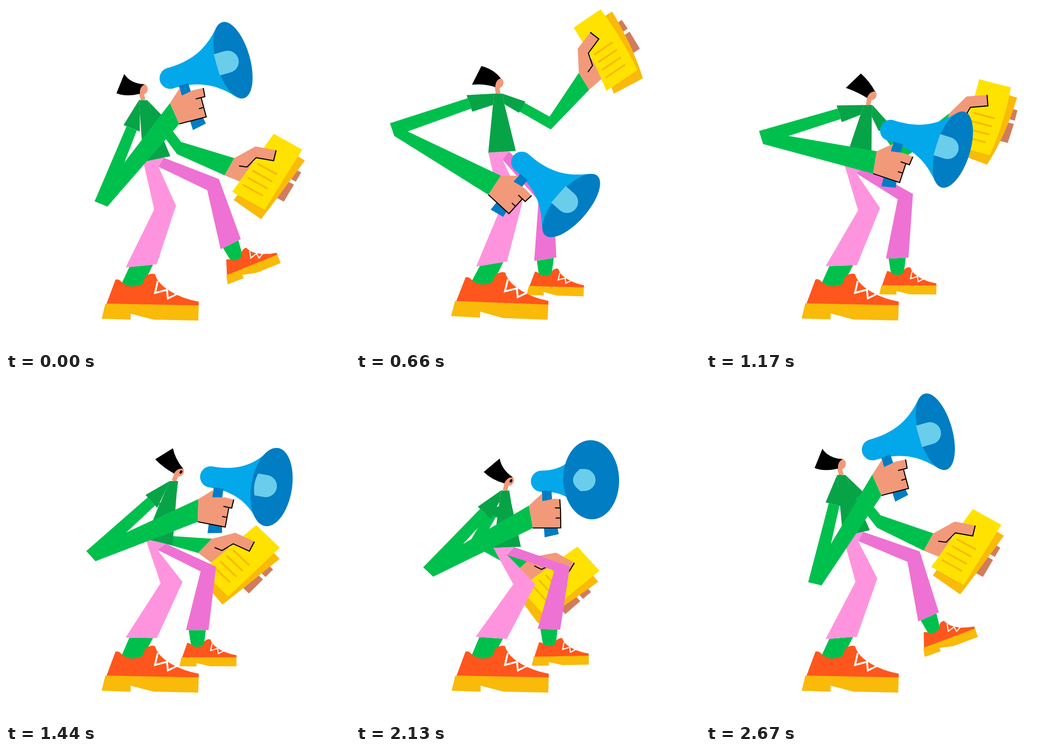
An HTML page with a canvas for the animation above (2.7 s loop, 748 by 748 pixels).

```html
<!DOCTYPE html>
<html lang="en">
<head>
<meta charset="utf-8">
<title>Walking announcer</title>
<style>
  html, body { margin: 0; height: 100%; overflow: hidden; background: #fff; }
  canvas { display: block; width: 100vw; height: 100vh; }
</style>
</head>
<body>
<canvas width="748" height="748"></canvas>
<script>
const ctx = document.querySelector('canvas').getContext('2d');
const LOOP = 2700;
const GREEN = '#00c04d', SHIRT = '#07a347', SKIN = '#f2997a', BLUE = '#007dc3', AMBER = '#f9ba09';

// hip, neck: x, y. head: tilt, hair curl. horn: x, y, angle, turn to the viewer.
// paper: x, y, angle, bend. step: lift of the far foot. All limbs follow from these.
const poses = [
  { t: 0, hip: [328, 333], neck: [298, 205], head: [0, 1], horn: [357, 157, -16, .1], paper: [571, 360, 29, 0], step: [1] },
  { t: 390, hip: [313, 306], neck: [286, 181], head: [0, .1], horn: [377, 308, 43.3, 0], paper: [510, 166, -33, -.12], step: [.04] },
  { t: 660, paper: [541, 94, -34, .05] },
  { t: 900, hip: [325, 334], neck: [335, 205], head: [12, -1], horn: [353, 330, 27.6, 0], paper: [579, 130, -34, .22], step: [0] },
  { t: 1090, paper: [613, 199, 2, .1] },
  { t: 1440, hip: [333, 357], neck: [365, 224], head: [36, .5], horn: [445, 215, 9.5, .35], paper: [513, 396, 43.5, 0], step: [0] },
  { t: 1860, hip: [333, 361], neck: [374, 236], head: [45, .6], horn: [410, 243, 11.8, .91], paper: [401, 440, 53, 0], step: [0] },
  { t: 2400, hip: [325, 365], neck: [280, 241], head: [8, 1], horn: [393, 191, -15.2, .35], paper: [521, 417, 38, 0], step: [.31] },
  { t: 2670, hip: [327, 338], neck: [294, 211], head: [0, 1], horn: [362, 156, -16, .1], paper: [569, 367, 29, 0], step: [.94] }
];

// Smooth periodic cubic through the poses that set the given part
function sample(part, t) {
  const keys = poses.filter(p => p[part]), n = keys.length;
  const value = (j, c) => keys[(j + n) % n][part][c];
  const time = j => keys[(j + n) % n].t + LOOP * Math.floor(j / n);
  const slope = (j, c) => (value(j + 1, c) - value(j, c)) / (time(j + 1) - time(j));
  const tangent = (j, c) => {
    const before = time(j) - time(j - 1), after = time(j + 1) - time(j);
    return (slope(j - 1, c) * after + slope(j, c) * before) / (before + after);
  };
  let i = n - 1;
  while (time(i) > t) i--;
  const span = time(i + 1) - time(i), u = (t - time(i)) / span, v = 1 - u;
  return keys[0][part].map((_, c) =>
    value(i, c) * v * v * (1 + 2 * u) + value(i + 1, c) * u * u * (3 - 2 * u)
    + span * u * v * (tangent(i, c) * v - tangent(i + 1, c) * u));
}

const DEG = Math.PI / 180;
const clamp = x => Math.min(1, Math.max(0, x));
const pairs = list => list.flatMap((x, i) => i % 2 ? [] : [[x, list[i + 1]]]);
const mix = (a, b, u) => [a[0] + (b[0] - a[0]) * u, a[1] + (b[1] - a[1]) * u];
const polar = ([x, y], angle, r) => [x + r * Math.cos(angle * DEG), y + r * Math.sin(angle * DEG)];
const across = (p, angle, half) => [polar(p, angle, half), polar(p, angle, -half)];
const direction = (a, b) => Math.atan2(b[1] - a[1], b[0] - a[0]) / DEG;

function trace(points) {
  ctx.beginPath();
  points.forEach(p => ctx.lineTo(...p));
}
function fill(color, points) {
  trace(points);
  ctx.fillStyle = color;
  ctx.fill();
}
function line(color, width, points) {
  trace(points);
  ctx.strokeStyle = color;
  ctx.lineWidth = width;
  ctx.stroke();
}
function path(color, d) {
  ctx.fillStyle = color;
  ctx.fill(new Path2D(d));
}
function ellipse(color, x, y, rx, ry) {
  ctx.beginPath();
  ctx.ellipse(x, y, rx, ry, 0, 0, 7);
  ctx.fillStyle = color;
  ctx.fill();
}
function within(m, drawing) {
  ctx.save();
  ctx.transform(m.a, m.b, m.c, m.d, m.e, m.f);
  drawing();
  ctx.restore();
}
const place = (x, y, angle, scale = 1) => new DOMMatrix().translate(x, y).rotate(angle).scale(scale);
const mapper = matrix => ([x, y]) => {
  const p = matrix.transformPoint({ x, y });
  return [p.x, p.y];
};

// Two-bone reach from the neck to the middle of the wrist
function bend(neck, wrist, upper, lower) {
  const target = mix(...wrist, .5);
  const d = Math.hypot(target[0] - neck[0], target[1] - neck[1]);
  const cos = (upper * upper + d * d - lower * lower) / (2 * upper * d);
  const angle = direction(neck, target) + Math.acos(Math.min(1, cos)) / DEG;
  return { angle, elbow: polar(neck, angle, upper) };
}
function drawArm(neck, { angle, elbow }, wrist, sleeve, half, elbowHalf, elbowTurn) {
  const [a, b] = across(polar(neck, angle, sleeve), angle + 90, half);
  const [c, d] = across(elbow, angle + elbowTurn, elbowHalf);
  fill(GREEN, [a, c, d, b]);
  fill(GREEN, [c, d, wrist[1], wrist[0]]);
  line(GREEN, 1, [c, d]);
}

function drawShoe(matrix) {
  within(matrix, () => {
    path('#ff561d', 'M218,649L238,595Q245,593 251,600Q262,610 275,610Q290,609 298,603Q300,584 318,582L324,583Q330,605 360,622Q386,637 419,643V653Z');
    line('#fff', 4, pairs([330,598, 324,624, 350,617, 352,636, 372,626]));
    path(AMBER, 'M216,647L419,651L418,684L321,682L271,669V682L208,680Z');
  });
}
function drawLeg(color, shoe, ankle, leg, top) {
  const hem = mapper(shoe)(ankle), hemAngle = leg.tilt - leg.flare;
  const [hemRight, hemLeft] = across(hem, hemAngle, leg.hem / 2);
  const knee = polar(hem, leg.tilt - 90, leg.shin);
  const [kneeRight, kneeLeft] = across(knee, hemAngle - leg.twist, leg.knee / 2);
  const sock = pairs([300,602, 288,613, 262,613, 252,602]).map(mapper(shoe));
  fill(GREEN, [mix(hemLeft, hemRight, .12), mix(hemLeft, hemRight, .88), ...sock]);
  drawShoe(shoe);
  fill(color, [top[0], kneeLeft, hemLeft, hemRight, kneeRight, ...top.slice(1)]);
}

// A tapered sheet; u runs across it, v along it
function paperMap([x, y, angle, curl]) {
  const map = mapper(place(x, y, angle));
  return ([u, v]) => map([
    -30 - 18 * v + (71 + 10 * v) * (u + curl * 4 * v * (1 - v)),
    -77 + 154 * v
  ]);
}
function drawPaper(at, wrist) {
  const sheet = (color, corners) => fill(color, corners.flatMap((p, i) =>
    Array.from({ length: 10 }, (_, k) => at(mix(p, corners[(i + 1) % 4], k / 10)))));
  fill(SKIN, [...wrist, ...pairs([-.22,.5, .02,.5, .02,.82]).map(at)]);
  for (const [v, length] of [[.29, .15], [.49, .28]])
    fill('#d17c5d', pairs([1,v, 1.33,v, 1.33,v + length, 1,v + length]).map(at));
  sheet(AMBER, pairs([.2,.1, 1.24,.117, 1.05,1.141, .165,1.092]));
  sheet('#ffe200', pairs([0,0, 1,0, 1,1, 0,1]));
  for (let row = 0; row < 4; row++) {
    const v = .48 + .12 * row;
    line(AMBER, 4, [at([.12, v]), at([.76, v])]);
  }
  const thumb = pairs([.347,.187, .46,.333, -.01,.415, -.066,.593, -.266,.634]).map(at);
  fill(SKIN, [wrist[1], at([-.22, .28]), ...thumb]);
  line('#000', 2.3, thumb);
}

function drawHead(neck, [tilt, curl], mouth) {
  const face = [neck[0] - 2 + tilt / 3, neck[1] - 24 + tilt / 15];
  line(SKIN, 10, [[face[0] - 3, face[1] + 4], neck]);
  within(place(...face, tilt), () => {
    ellipse(SKIN, 0, 0, 12, 12);
    const top = [-17 - 10 * curl, -22 + 9 * curl], under = [-31 - 3 * curl, 9.5 + 8 * curl];
    path('#000', `M-56,9L-39,-33Q${top} 5,-10Q-6,-5 -5,10Q${under} -56,9Z`);
    ellipse('#000', 5.5, -1.5, 3.2 * mouth, 5 * mouth);
  });
}

function drawShirt(neck, hip, hem, front, back) {
  const spine = direction(neck, hip), chest = polar(neck, spine, 24);
  const collar = [[neck[0] - 9, neck[1]], [neck[0] + 9, neck[1]]];
  const pits = [polar(chest, spine + 90, 13), polar(chest, spine - 90, 12)];
  const cuff = (arm, reach, half) => across(polar(neck, arm.angle, reach), arm.angle + 90, half);
  fill(SHIRT, [collar[0], pits[0], ...hem, pits[1], collar[1]]);
  fill(SHIRT, [collar[0], ...cuff(front, 66, 19), pits[0]]);
  fill(SHIRT, [collar[1], ...cuff(back, 60, 14).reverse(), pits[1]]);
}

function drawMegaphone(matrix, turn, move) {
  const length = 143 * Math.cos(turn), bell = Math.hypot(36 * Math.cos(turn), 83 * Math.sin(turn));
  const flat = 2.6 * (1 - Math.cos(turn));
  within(matrix, () => {
    const rim = length - .4 * bell, c1 = length * .5, c2 = length * .72;
    path('#02a8ea', `M0,-23C${c1},-22 ${c2},-52 ${rim},-79V79C${c2},52 ${c1},22 0,23A23,23 0 0 1 0,-23Z`);
    ellipse(BLUE, length, 0, bell, 86);
    const core = length - 12 - 4 * flat, left = core - 25 * (1 - flat);
    path('#6bcdec', `M${left},-24H${core}A24,24 0 0 1 ${core},24H${left}Q${left - 50 * flat},0 ${left},-24Z`);
    fill(BLUE, move([14,21, 35,21, 36,45, 48,116, 17,122, 14,45]));
    const tip = 64 - 18 * flat, fold = 62 - 14 * flat;
    fill(SKIN, move([-8,101, -15,52, 15,26, 13.5,43.4, 41,38.8, tip,40.3, fold,59.4, 53.5,60, 52.7,102.5]));
    for (const stroke of [
      [tip,40.3, fold,59.4, 41.4,58.7], [53.5,60, 52.7,102.5, -8,101], [42.3,81, 53.5,81]
    ]) line('#000', 2.3, move(stroke));
  });
}

function draw(t) {
  const [hip, neck, head, horn, paper, [step]] =
    ['hip', 'neck', 'head', 'horn', 'paper', 'step'].map(part => sample(part, t));

  const lean = (neck[0] - hip[0]) * .4;
  const hem = across(hip, lean, 30).reverse();
  const crotch = polar(hip, lean + 90, 17), waist = mix(...hem, .75);
  const squat = hip[1] - 306;
  const lift = Math.sin(Math.PI * clamp((t - 560) / 640)) ** 2;
  const nearShoe = place(418 - 6 * lift, 684 - 8 * lift, 4.6 * lift).translate(-418, -684);
  const farShoe = place(501 + 96 * step, 627 - 68 * step, -1 - 22 * step, .59).translate(-418, -684);

  const at = paperMap(paper);
  const farWrist = pairs([-.43,.85, -.51,.57]).map(at);
  const farArm = bend(neck, farWrist, 130, 117);

  const hornMatrix = place(horn[0], horn[1], horn[2]);
  const shift = -57 * (1 - Math.cos(horn[3]));
  const move = list => pairs(list).map(([x, y]) => [x + shift, y]);
  const nearWrist = move([-15,52, -8,101]).map(mapper(hornMatrix));
  const nearArm = bend(neck, nearWrist, 243, 253);

  ctx.fillStyle = '#fff';
  ctx.fillRect(0, 0, 748, 748);
  drawArm(neck, farArm, farWrist, 55, 11, 14, 55);
  drawPaper(at, farWrist);
  drawLeg('#ee72d3', farShoe, [276, 548],
    { tilt: -4 + .28 * squat - 20 * step, shin: 135, hem: 49, knee: 35, flare: 10, twist: 17 }, [crotch, waist]);
  drawLeg('#ff94de', nearShoe, [294, 565],
    { tilt: 15 + .27 * squat + 3 * lift, shin: 137, hem: 68, knee: 48, flare: 28, twist: 4 }, [hem[0], crotch, waist]);
  drawHead(neck, head, .8 * clamp(Math.min(t - 1200, 2640 - t) / 150));
  drawShirt(neck, hip, hem, nearArm, farArm);
  drawArm(neck, nearArm, nearWrist, 66, 12, 15, 90);
  drawMegaphone(hornMatrix, horn[3], move);
}

const start = performance.now();
function tick() {
  draw((performance.now() - start) % LOOP);
  requestAnimationFrame(tick);
}
tick();
</script>
</body>
</html>
```
